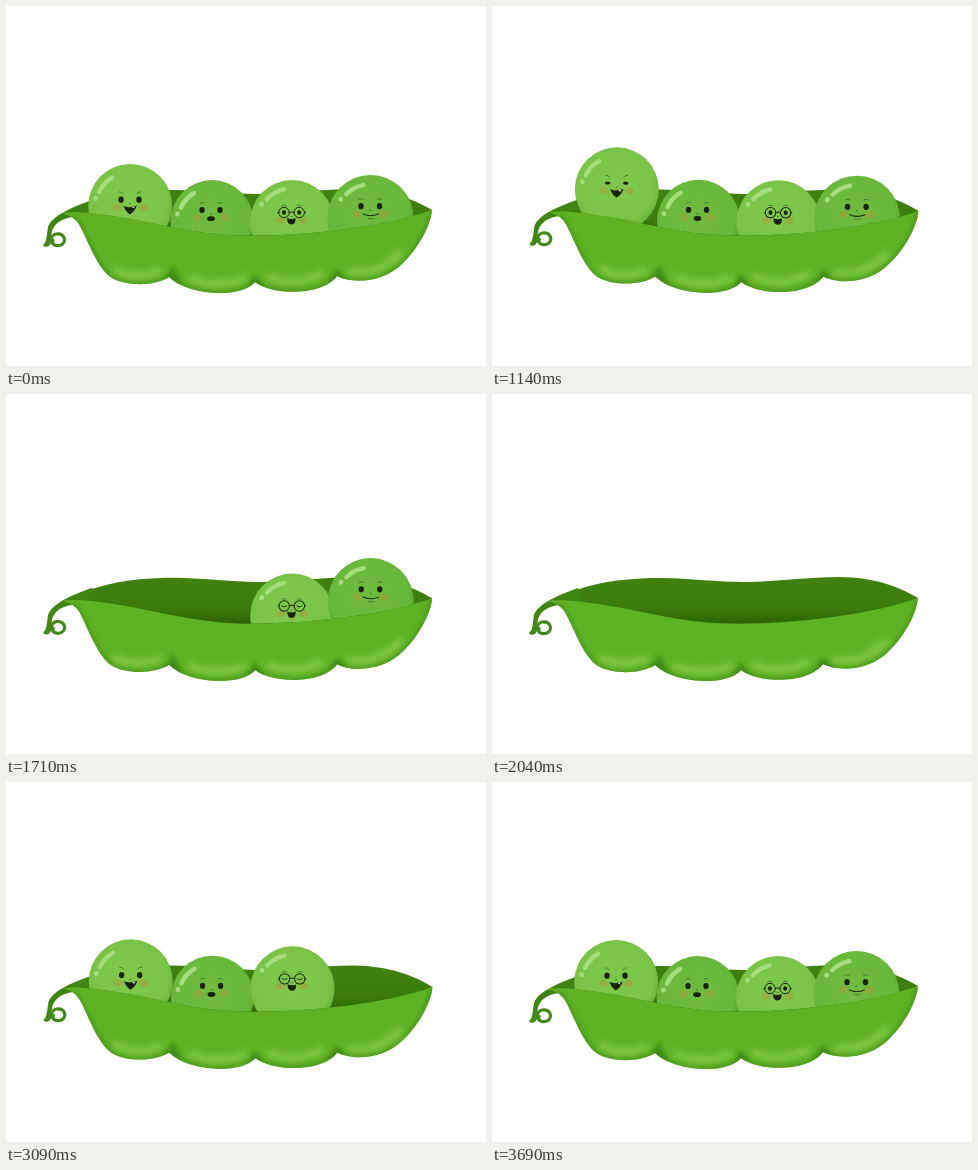
Write an HTML page that moves like this. It is 480 px wide and 360 px high and loops after 3.78 s.

```html
<!DOCTYPE html>
<html lang="en">
<head>
<meta charset="utf-8">
<title>Peas in a pod</title>
<style>
html, body { margin: 0; width: 100%; height: 100%; overflow: hidden; background: #fff; }
svg { display: block; width: 100vw; height: 100vh; }
</style>
</head>
<body>
<svg viewBox="0 0 480 360" xmlns="http://www.w3.org/2000/svg">
  <defs>
    <radialGradient id="light" cx=".48" cy=".45" r=".54">
      <stop offset="0" stop-color="#7fc84d"/><stop offset=".85" stop-color="#79c447"/><stop offset="1" stop-color="#6cb83b"/>
    </radialGradient>
    <radialGradient id="deep" cx=".48" cy=".45" r=".54">
      <stop offset="0" stop-color="#6fbc41"/><stop offset=".85" stop-color="#6ab83b"/><stop offset="1" stop-color="#59a72c"/>
    </radialGradient>
    <linearGradient id="inside" x1="0" y1="184" x2="0" y2="230" gradientUnits="userSpaceOnUse">
      <stop offset="0" stop-color="#3f820f"/><stop offset=".65" stop-color="#3b7c0c"/><stop offset="1" stop-color="#2c6203"/>
    </linearGradient>
    <filter id="soft" x="-30%" y="-60%" width="160%" height="220%"><feGaussianBlur stdDeviation="3"/></filter>
    <filter id="shade" x="-80%" y="-80%" width="260%" height="260%"><feGaussianBlur stdDeviation="2.2"/></filter>
    <clipPath id="above"><path d="M56 207C72 205 92 208 112 211C145 216 175 225 215 228.500C270 233 372 224 426 204V60H56Z"/></clipPath>
    <clipPath id="frontClip"><use href="#front"/></clipPath>
  </defs>
  <g id="pod">
    <path d="M62 207C84 193 118 184 168 184C200 184.500 225 188 252 188C288 187.500 315 183 348 183C382 183.500 406 192 426 204L395 222L330 240H180L100 215Z" fill="url(#inside)"/>
    <path d="M86 194C64 202 46 210 42 221C40.500 230 41 235 37 240.500C43 238 45.500 231 46 225C49 217 56 212 68 211L92 208Z" fill="#3f8512"/>
    <path d="M39 239C45 241 43 229 50 228C59 227 61 236 55 239C50 241 45 238 47 234.500" fill="none" stroke="#43891a" stroke-width="3.200" stroke-linecap="round"/>
    <g id="peas" clip-path="url(#above)"></g>
    <path id="front" d="M56 207C72 205 92 208 112 211C145 216 175 225 215 228.500C270 233 372 224 426 204C425 219 412 243 397 257C378 277 346 278 331 270C317 290 267 290 249 276C237 292 183 291 163 271C150 280 120 281 105 271.500C92 262 84 240 75.500 223C72 215 67 210 56 207Z" fill="#60b225"/>
    <g clip-path="url(#frontClip)">
      <g fill="none" stroke="#43911a" stroke-width="5" opacity=".75" filter="url(#shade)">
        <path d="M67 210C81 229 90 262 106 272C121 281 150 280 163 271C183 291 237 292 249 276C267 290 317 290 331 270C346 278 378 277 397 257C414 241 422 224 426 204"/>
      </g>
      <g fill="#3b8613" filter="url(#shade)" opacity=".8">
        <path d="M167 259L159 275L177 280Z"/><path d="M249 268L241 281L257 281Z"/><path d="M331 263L322 277L340 274Z"/>
      </g>
      <g fill="none" stroke="#7fca45" stroke-width="7" stroke-linecap="round" filter="url(#soft)">
        <path d="M110 264Q131 274 153 265"/><path d="M184 272Q211 283 238 272"/>
        <path d="M263 271Q288 281 315 268"/><path d="M344 266Q372 270 394 247"/>
      </g>
    </g>
  </g>
</svg>
<script>
const NS = "http://www.w3.org/2000/svg";
const LOOP = 3780, INK = "#17230d";
const layer = document.getElementById("peas");
const pod = document.getElementById("pod");

function add(parent, tag, attrs) {
  const el = document.createElementNS(NS, tag);
  for (const key in attrs) el.setAttribute(key, attrs[key]);
  parent.appendChild(el);
  return el;
}
const line = (parent, d, width = 1, color = INK) =>
  add(parent, "path", { d, fill: "none", stroke: color, "stroke-width": width, "stroke-linecap": "round" });
const oval = (parent, cx, cy, rx, ry, fill = INK) => add(parent, "ellipse", { cx, cy, rx, ry, fill });

const mouths = [
  g => {
    add(g, "path", { d: "M-7 0Q-3 1.500 0 1Q3 .5 6.500 -.5Q5 5 -.5 8.500Q-5 5 -7 0Z", fill: INK });
    add(g, "path", { d: "M1.500 .9L4.500 .2L3.500 2.500Z", fill: "#dfe8cf" });
  },
  g => oval(g, -1, -2.8, 3.9, 2.4),
  g => add(g, "path", { d: "M-5 -4Q-.5 -2 3.500 -4Q4 2.500 -.7 2.500Q-5 2 -5 -4Z", fill: INK }),
  g => { line(g, "M-7.500 -4Q0 -.5 8 -4", 1); line(g, "M-2.500 .5Q.5 1.300 3.500 .5", .8, "#3f7a1e"); }
];

// eyes: [left x, right x, y]; lean turns the shine around the pea
const peas = [
  { x: 124.2, y: 200, r: 42, fill: "light", lean: 0, eyes: [-9.2, 8.8, -6.3], brow: 3, out: 900, back: 2460, hop: 19 },
  { x: 206, y: 215.5, r: 41.5, fill: "deep", lean: 0, eyes: [-10, 8, -11.5], brow: -1, out: 1140, back: 2675, hop: 19 },
  { x: 286, y: 216, r: 42, fill: "light", lean: 18, eyes: [-8, 7.2, -9.5], brow: 0, out: 1380, back: 2933, hop: 19 },
  { x: 364.5, y: 212, r: 43, fill: "deep", lean: 20, eyes: [-9.5, 9, -11.8], brow: 0, out: 1620, back: 3120, hop: 15 }
];

peas.forEach((p, i) => {
  const g = p.node = add(layer, "g", {});
  add(g, "circle", { r: p.r, fill: `url(#${p.fill})` });
  const shine = add(g, "g", { transform: `rotate(${p.lean})` });
  line(shine, "M-31 -14Q-27 -23 -18 -28.500", 4.4, "#a6de7d");
  oval(shine, -34.5, -7.5, 2.3, 2.6, "#a6de7d");

  const [l, r, y] = p.eyes;
  for (const x of [l - 4, r + 4]) oval(g, x, y + 7.7, 4.6, 3.8, "#a89b38").setAttribute("opacity", .5);
  oval(g, (l + r) / 2, y + 4, 1, .6, "#3a6b1c");
  const glasses = i === 2;
  p.lids = [l, r].map((x, side) => {
    const s = side ? 1 : -1, slant = p.brow * s * .3;
    line(g, `M${x - 2} ${y - 7 + slant}Q${x} ${y - 8} ${x + 2} ${y - 7 - slant}`, .8, "#3a6b1c");
    if (glasses) add(g, "circle", { cx: x, cy: y, r: 5.2, fill: "none", stroke: INK, "stroke-width": 1 });
    const size = glasses ? 2 : 2.7;
    return {
      x, y,
      open: oval(g, 0, 0, size, size * 1.15),
      shut: line(g, `M${x - 2.5} ${y}Q${x} ${y + 2} ${x + 2.5} ${y}`, .9)
    };
  });
  if (glasses) line(g, `M${l + 5.2} ${y}Q-.4 ${y - 1.5} ${r - 5.2} ${y}M${l - 5.2} ${y}h-1M${r + 5.2} ${y}h1`, 1);
  mouths[i](g);
});

const clamp = v => Math.max(0, Math.min(1, v));
const smooth = v => { v = clamp(v); return v * v * (3 - 2 * v); };
const mix = (a, b, v) => a + (b - a) * v;

// height above the resting place
function dropOut(t) {
  return t < 240 ? 16 * smooth(t / 240) : 16 - 84 * ((t - 240) / 180) ** 2;
}
function popIn(t, hop) {
  if (t < 110) return mix(-82, hop, 1 - (1 - clamp((t + 30) / 140)) ** 2);
  if (t < 230) return mix(hop, -7, smooth((t - 110) / 120));
  return mix(-7, 0, smooth((t - 230) / 160));
}
function lift(p, t) {
  if (t < p.out) return 0;
  if (t < p.out + 420) return dropOut(t - p.out);
  return t < p.back - 30 ? -90 : popIn(t - p.back, p.hop);
}

const blink = (t, from, to) => t < from || t > to ? 1 : Math.abs(2 * (t - from) / (to - from) - 1);
function eyeOpen(p, i, t) {
  if (t >= p.back - 30) return smooth((t - p.back - 230) / 80);
  if (t >= p.out) {
    const u = t - p.out;
    return 1 - smooth((u - 150) / 180);
  }
  if (i === 0) return blink(t, 30, 150);
  if (i === 1) return blink(t, 400, 490);
  if (i === 3) return blink(t, 150, 280);
  return t < 900 ? 1 - .75 * smooth((t - 620) / 130) : mix(.25, 1, smooth((t - 900) / 90));
}

const sway = [
  [0, 0], [900, 0], [1000, -.4], [1140, .3], [1380, .7], [1560, .3], [1740, .1], [1860, -.5], [1980, -.2], [2040, 0],
  [2460, 0], [2550, .3], [2670, -.6], [2790, -.1], [2900, -.3], [3000, 0], [3090, .3], [3200, -.2], [3340, .5], [3510, 0], [LOOP, 0]
];
function tilt(t) {
  const k = sway.findIndex(s => s[0] > t);
  const [t0, a] = sway[k - 1], [t1, b] = sway[k];
  return mix(a, b, smooth((t - t0) / (t1 - t0)));
}

function draw(t) {
  const a = tilt(t);
  pod.setAttribute("transform", `translate(${a * 1.3} 0) rotate(${a} 245 230)`);
  peas.forEach((p, i) => {
    p.node.setAttribute("transform", `translate(${p.x} ${p.y - lift(p, t)})`);
    const o = eyeOpen(p, i, t), closed = o < .2;
    for (const e of p.lids) {
      e.open.setAttribute("transform", `translate(${e.x} ${e.y}) scale(1 ${Math.max(o, .2)})`);
      e.open.setAttribute("visibility", closed ? "hidden" : "visible");
      e.shut.setAttribute("visibility", closed ? "visible" : "hidden");
    }
  });
}

const start = performance.now();
function tick() {
  draw((performance.now() - start) % LOOP);
  requestAnimationFrame(tick);
}
tick();
</script>
</body>
</html>
```
